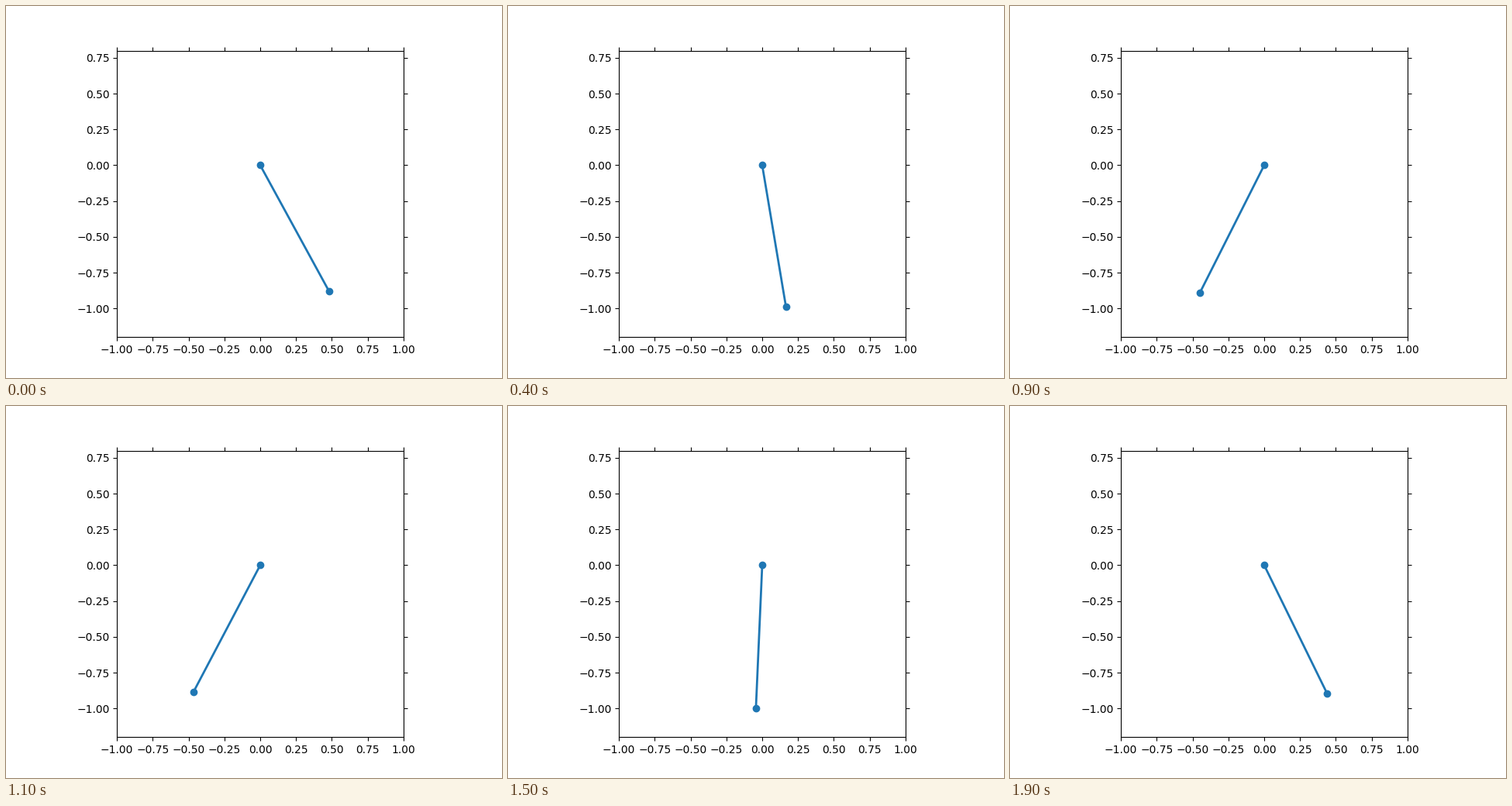
A matplotlib script for the animation above (2000 ms loop, 640 px wide and 480 px high).

```python
import numpy as np
import matplotlib.pyplot as plt
from matplotlib.animation import FuncAnimation

FRAMES = 20
INTERVAL = 100  # ms
GRAVITY = 9.81
LENGTH = 1.0
START_ANGLE = 0.5
SUBSTEPS = 20


def slope(state):
    angle, speed = state
    return np.array([speed, -GRAVITY / LENGTH * np.sin(angle)])


def rk4_step(state, dt):
    k1 = slope(state)
    k2 = slope(state + dt / 2 * k1)
    k3 = slope(state + dt / 2 * k2)
    k4 = slope(state + dt * k3)
    return state + dt / 6 * (k1 + 2 * k2 + 2 * k3 + k4)


def swing():
    """Pendulum angle at each frame, released from rest."""
    state = np.array([START_ANGLE, 0.0])
    dt = INTERVAL / 1000 / SUBSTEPS
    angles = []
    for _ in range(FRAMES):
        angles.append(state[0])
        for _ in range(SUBSTEPS):
            state = rk4_step(state, dt)
    return angles


angles = swing()

fig, ax = plt.subplots(figsize=(6.4, 4.8), dpi=100)
ax.set_aspect("equal")
ax.set_xlim(-1, 1)
ax.set_ylim(-1.2, 0.8)
ax.tick_params(top=True, right=True)
rod, = ax.plot([], [], "o-", color="tab:blue", lw=2)


def update(frame):
    angle = angles[frame]
    rod.set_data([0, LENGTH * np.sin(angle)], [0, -LENGTH * np.cos(angle)])
    return rod,


anim = FuncAnimation(fig, update, frames=FRAMES, interval=INTERVAL,
                     repeat=True, repeat_delay=0)
plt.show()
```
